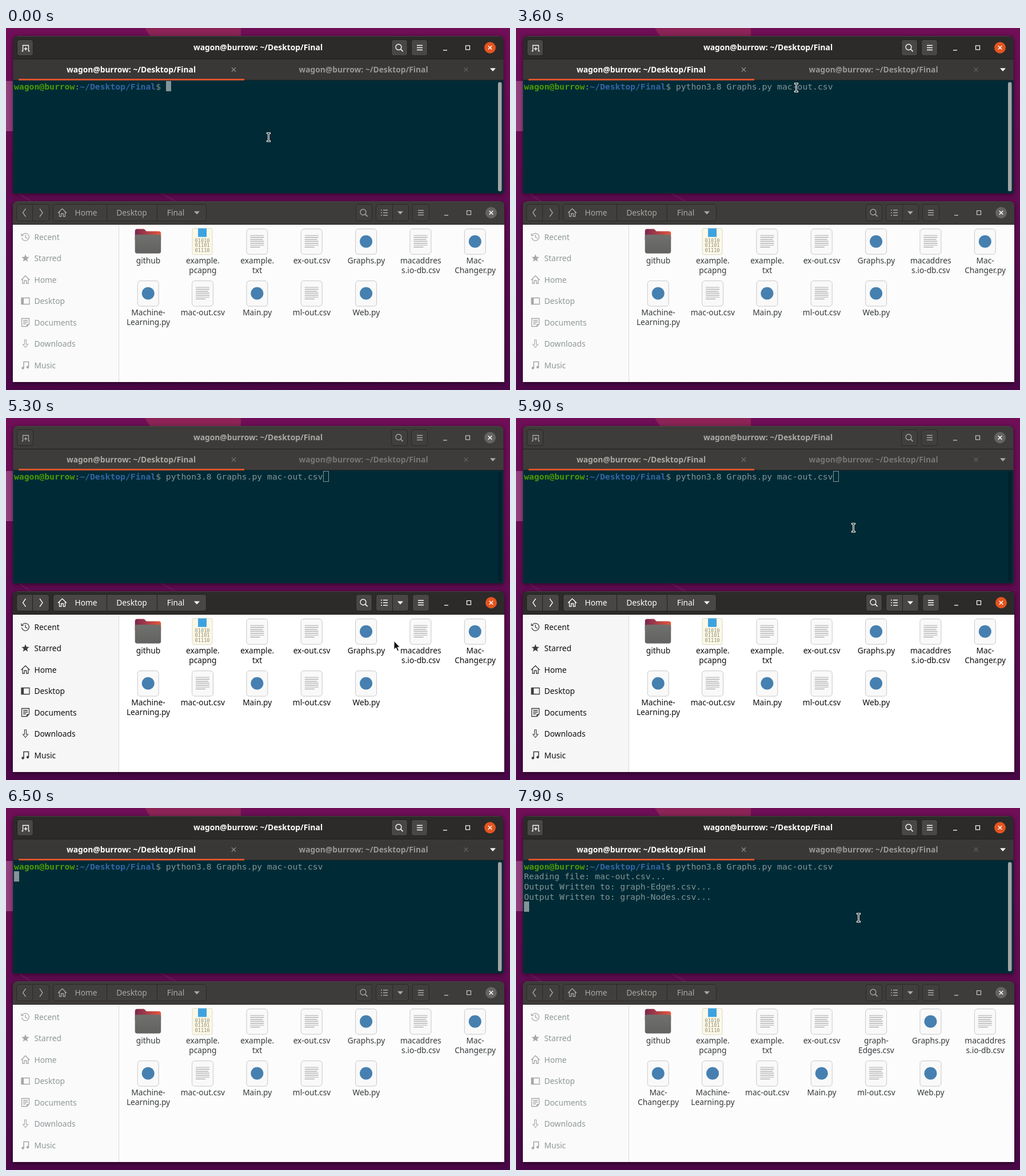
Animation, 882 px wide and 635 px high, one loop 8 s. Source, as an HTML page:

```html
<!DOCTYPE html>
<html lang="en">
<head>
<meta charset="utf-8">
<title>Terminal and files</title>
<style>
  html, body { margin: 0; width: 100%; height: 100%; overflow: hidden; background: #5c0c50; }
  svg { display: block; width: 882px; height: 635px; }
  text { font: 13.75px "Noto Sans", "Open Sans", sans-serif; white-space: pre; }
  .bold { font-size: 13.8px; font-weight: 700; }
  .mono { font: 14.73px "DejaVu Sans Mono", monospace; }
  .strong { font-weight: 700; }
  .bits { font: 8.6px "DejaVu Sans Mono", monospace; }
  .win { filter: drop-shadow(0 2px 4px #0008); }
</style>
</head>
<body>
<svg id="stage" viewBox="0 0 882 635"></svg>
<script>
const LOOP = 8000, STEP = 100;
const CELL = 8.868, ROW = 17.7, LEFT = 14, TOP = 93;
const HOST = 'wagon@burrow', DIR = '~/Desktop/Final', COMMAND = 'python3.8 Graphs.py mac-out.csv';
const OUTPUT = [
  [7000, 'Reading file: mac-out.csv...'],
  [7500, 'Output Written to: graph-Edges.csv...'],
  [7900, 'Output Written to: graph-Nodes.csv...']
];
const FILES = ['github', 'example.|pcapng', 'example.|txt', 'ex-out.csv', 'Graphs.py',
  'macaddres|s.io-db.csv', 'Mac-|Changer.py', 'Machine-|Learning.py', 'mac-out.csv',
  'Main.py', 'ml-out.csv', 'Web.py'];
const FILES_AFTER = [...FILES.slice(0, 4), 'graph-|Edges.csv', ...FILES.slice(4)];
const POINTER = [ // time, x, y
  [0, 459, 191], [700, 459, 191], [1800, 458, 181], [2100, 400, 104], [2200, 400, 104],
  [2400, 462, 136], [3000, 462, 136], [3300, 462, 99], [3500, 462, 99], [3600, 490, 104],
  [3800, 474, 104], [4100, 474, 104], [4900, 708, 457], [5100, 708, 457],
  [5900, 590, 192], [6000, 599, 192], [8000, 599, 192]
];

const within = (t, spans) => spans.some(([a, b]) => t >= a && t < b);
const clamp = v => Math.max(0, Math.min(1, v));
const lerp = (a, b, u) => a + (b - a) * u;
const mix = (a, b, u) => `rgb(${[1, 3, 5].map(i =>
  Math.round(lerp(parseInt(a.slice(i, i + 2), 16), parseInt(b.slice(i, i + 2), 16), u)))})`;

const rect = (x, y, w, h, fill, more = '') =>
  `<rect x="${x}" y="${y}" width="${w}" height="${h}" fill="${fill}" ${more}/>`;
const circle = (x, y, r, fill, more = '') =>
  `<circle cx="${x}" cy="${y}" r="${r}" fill="${fill}" ${more}/>`;
const path = (d, stroke, width = 1.3, fill = 'none', cap = 'butt') =>
  `<path d="${d}" stroke="${stroke}" stroke-width="${width}" fill="${fill}" stroke-linecap="${cap}"/>`;
const solid = (d, fill) => `<path d="${d}" fill="${fill}"/>`;
const text = (x, y, s, fill, cls = '', anchor = 'start') =>
  `<text x="${x}" y="${y}" fill="${fill}" class="${cls}" text-anchor="${anchor}">${s}</text>`;
const at = (x, y, s) => `<g transform="translate(${x} ${y})">${s}</g>`;
const cross = (x, y, r, color, width) =>
  path(`M${x - r} ${y - r}l${2 * r} ${2 * r}m0 ${-2 * r}l${-2 * r} ${2 * r}`, color, width);
const triangle = (x, y, fill) => solid(`M${x - 5} ${y - 2.5}h10l-5 5.5z`, fill);
const magnifier = (x, y, fg) =>
  circle(x - 1, y - 1, 5, 'none', `stroke="${fg}" stroke-width="1.3"`) +
  path(`M${x + 2.6} ${y + 2.6}l4 4`, fg, 1.5);
const bars = (x, y, fg) => path(`M${x - 5} ${y - 4}h10m-10 4h10m-10 4h10`, fg, 1.4);
const house = 'M-7.5 .5L0-7L7.5 .5M-5-1.5V6.5H-1.8V1.5H1.8V6.5H5V-1.5';

function background() {
  return `<defs>
    <linearGradient id="wall" x2="0" y2="1">
      <stop stop-color="#700f58"/><stop offset=".5" stop-color="#600c52"/><stop offset="1" stop-color="#4b0848"/>
    </linearGradient>
    <linearGradient id="tab"><stop stop-color="#782850"/><stop offset="1" stop-color="#e4573b"/></linearGradient>
    <linearGradient id="front" x2="0" y2="1"><stop stop-color="#70706e"/><stop offset="1" stop-color="#626261"/></linearGradient>
    </defs>` +
    rect(0, 0, 882, 635, 'url(#wall)') +
    solid('M243 0H411V30H262z', '#8d2457') +
    rect(-8, 93, 24, 88, '#95417f', 'rx="4"') +
    path('M20 288L46 306M268 288L300 306', '#741a5c', 2);
}

function windowFrame(x, y, w, h, headH, u) {
  return `<g class="win">${solid(`M${x} ${y + h}V${y + 8}q0-8 8-8H${x + w - 8}q8 0 8 8V${y + h}z`,
    mix('#3d3c3a', '#2c2b2a', u))}</g>` +
    path(`M${x + 7} ${y + .5}H${x + w - 7}`, mix('#4a4947', '#454341', u), 1) +
    rect(x, y + headH, w, 1, '#1f1e1d');
}

function controls(x, y, u) {
  const fg = mix('#c6c5c2', '#ffffff', u);
  return path(`M${x - 82} ${y + 4.5}h7`, fg) +
    rect(x - 42.5, y - 3.5, 7, 7, 'none', `stroke="${fg}" stroke-width="1.2"`) +
    circle(x, y, 10, mix('#656462', '#e4541f', u)) + cross(x, y, 3.3, '#fff', 1.5);
}

const button = (x, y, w, h, u) => rect(x + .5, y + .5, w - 1, h - 1,
  mix('#403f3d', '#484745', u), `rx="4" stroke="${mix('#2a2928', '#222120', u)}"`);

function caret(t, focus) {
  const row = t < 6500 ? 0 : 1 + OUTPUT.filter(([when]) => t >= when).length;
  const col = row ? 0 : t < 1200 ? 30 : 61;
  const x = Math.round(LEFT + col * CELL), y = Math.round(TOP + row * ROW);
  if (focus < .5) return rect(x + .5, y + .5, 9, 18, 'none', 'stroke="#839496"');
  return within(t, [[600, 1200], [1800, 2400], [3100, 3700], [4300, 4900], [7100, 7600]])
    ? '' : rect(x, y, 9, 18, '#839496');
}

function terminal(t, u) {
  const fg = mix('#aaa9a6', '#ffffff', u), dim = mix('#777674', '#999896', u);
  const title = `${HOST}: ${DIR}`;
  const line = (row, s) => text(LEFT, 107.6 + row * ROW, s, '#839496', 'mono');
  const typed = t < 1200 ? '' : COMMAND;
  return windowFrame(12.5, 14, 858, 276, 40, u) +
    button(19, 20, 29, 29, u) + button(674, 20, 29, 29, u) + button(709, 20, 29, 29, u) +
    path('M27.5 40.5h2v-10h10v10h2M34.5 33.5v6m-3-3h6', fg) +
    magnifier(688, 34.5, fg) + bars(724, 34.5, fg) + controls(847, 34.5, u) +
    text(441, 39, title, fg, 'bold', 'middle') +
    rect(12.5, 55, 858, 37, mix('#3d3c3a', '#393837', u)) +
    rect(12.5, 91, 858, 1, '#232221') + rect(22, 89, 395, 3, '#dc532b') +
    text(219, 78, title, fg, 'bold', 'middle') + text(625.5, 78, title, dim, 'bold', 'middle') +
    cross(398.5, 73, 3.6, mix('#777674', '#9a9996', u), 1.2) + cross(805, 73, 3.6, '#676664', 1.2) +
    triangle(852, 73, fg) +
    rect(12.5, 92, 858, 198, '#002b36') +
    rect(861, 95, 6.5, 191.5, mix('#00222c', '#a0a6a5', u), 'rx="3"') +
    line(0, `<tspan fill="#4e9a06" class="strong">${HOST}</tspan>:<tspan fill="#3465a4" class="strong">${DIR}</tspan>$ ${typed}`) +
    OUTPUT.map(([when, s], i) => t >= when ? line(i + 1, s) : '').join('') +
    caret(t, u);
}

function sidebar(u) {
  const ink = mix('#8f9798', '#0e0f10', u), icon = mix('#a5a6a5', '#3b3c3d', u);
  const star = Array.from({ length: 10 }, (_, i) => {
    const r = i % 2 ? 3 : 7.2, a = i * Math.PI / 5;
    return `${(r * Math.sin(a)).toFixed(1)} ${(-r * Math.cos(a)).toFixed(1)}`;
  }).join('L');
  const items = [
    ['Recent', path('M-5.5-3.5A6.5 6.5 0 1 1-6.5 1M-7-6v3.5h3.5M0-4V.5L3.5 2.5', icon)],
    ['Starred', solid(`M${star}z`, icon)],
    ['Home', path(house, icon)],
    ['Desktop', path('M-7-5.5H7V5.5H-7z', icon) + rect(-7, -5, 4, 10, icon)],
    ['Documents', path('M-6.5-7H6.5V3L2.5 7H-6.5zM-4-3.5h8m-8 3h8m-8 3h5', icon) + solid('M2 7V3H6.5z', icon)],
    ['Downloads', path('M-1.5-7h3v8h3L0 6.5L-4.5 1h3z', icon, 1.1)],
    ['Music', path('M-3 4.5V-6H5.5V3', icon, 1.5) + circle(-4.5, 5, 2.2, icon) + circle(4, 3.5, 2.2, icon)]
  ];
  return rect(12, 345, 185, 276, mix('#fafafa', '#f6f6f6', u)) + rect(197, 345, 1, 276, '#dadad9') +
    items.map(([name, mark], i) => at(34, 366.5 + 37.5 * i, mark + text(15.5, 5, name, ink))).join('');
}

function fileIcon(name) {
  if (name === 'github') {
    return solid('M-23-18q0-4 4-4h12l4 4h21.5q4 0 4 4v12H-23z', 'url(#tab)') +
      rect(-23, -12, 45.5, 33, 'url(#front)', 'rx="4"');
  }
  if (name.endsWith('pcapng')) {
    return rect(-18, -23, 35, 46, '#fbf8e8', 'rx="3" stroke="#dedac6"') +
      rect(-8, -23, 15, 15, '#3da2e0') +
      ['01010', '01101', '01110'].map((s, i) => text(-.5, 1.2 + 8.4 * i, s, '#8f8a73', 'bits', 'middle')).join('');
  }
  const page = rect(-18.5, -22, 37, 44.5, '#f9f9f9', 'rx="5" stroke="#c8c8c8"');
  if (name.endsWith('.py')) return page + circle(0, 0, 11, '#4680b0');
  const widths = [24, 24, 22, 24, 24, 24, 17];
  return page + path(widths.map((w, i) => `M-12 ${-10.5 + i * 3.4}h${w}`).join(''), '#a6a7a7', 1.2);
}

function files(t, u) {
  const fg = mix('#aaa9a6', '#ffffff', u), ink = mix('#35393b', '#0c0c0c', u);
  const edge = mix('#2a2928', '#222120', u);
  const list = t < 7600 ? FILES : FILES_AFTER;
  return windowFrame(12, 304, 860, 317, 40, u) +
    button(18, 309, 58, 30, u) + button(82, 309, 269, 30, u) + button(612, 309, 29, 30, u) +
    button(647, 309, 58, 30, u) + button(711, 309, 30, 30, u) +
    path('M46.5 310v28M176.5 310v28M264.5 310v28M676.5 310v28', edge, 1) +
    path('M34.5 317l-5 7l5 7M59 317l5 7l-5 7', fg, 1.3) +
    at(98.5, 324, path(house, fg)) +
    text(140, 329, 'Home', fg, '', 'middle') + text(220, 329, 'Desktop', fg, '', 'middle') +
    text(297, 329, 'Final', fg, '', 'middle') + triangle(334, 324, fg) + magnifier(626, 324, fg) +
    path('M656 319.5h2m2 0h8m-12 4.5h2m2 0h8m-12 4.5h2m2 0h8', fg, 1.6) +
    triangle(690, 324, fg) + bars(726, 324, fg) + controls(849, 324, u) +
    rect(198, 345, 674, 276, mix('#fcfcfc', '#ffffff', u)) + sidebar(u) +
    list.map((name, i) => at(248.7 + 95.35 * (i % 7), 374.5 + 91 * Math.floor(i / 7),
      fileIcon(name) + name.split('|').map((s, k) => text(.3, 38.5 + 16.7 * k, s, ink, '', 'middle')).join(''))).join('');
}

function pointer(t) {
  if (within(t, [[700, 1800], [6500, 7000]])) return '';
  const i = POINTER.findIndex(p => p[0] > t);
  const [a, b] = [POINTER[i - 1], POINTER[i]];
  const u = (t - a[0]) / (b[0] - a[0]);
  const x = lerp(a[1], b[1], u), y = lerp(a[2], b[2], u);
  const beam = 'M-2-7H2M0-7V7M-2 7H2';
  return at(x + .5, y + .5, y > 92 && y < 290
    ? path(beam, '#fff', 3, 'none', 'square') + path(beam, '#111', 1, 'none', 'square')
    : path('M0 0V15L3.5 11.8L6 17.5L8.5 16.5L6.1 10.8H10.5z', '#fff', 1, '#111'));
}

const stage = document.getElementById('stage');
let shown = -1;
function frame(now) {
  const t = Math.floor(now % LOOP / STEP) * STEP;
  if (t !== shown) {
    shown = t;
    const away = clamp((t - 5100) / 200) - clamp((t - 6000) / 200);
    stage.innerHTML = background() + terminal(t, 1 - away) + files(t, away) + pointer(t);
  }
  requestAnimationFrame(frame);
}
frame(0);
</script>
</body>
</html>
```
